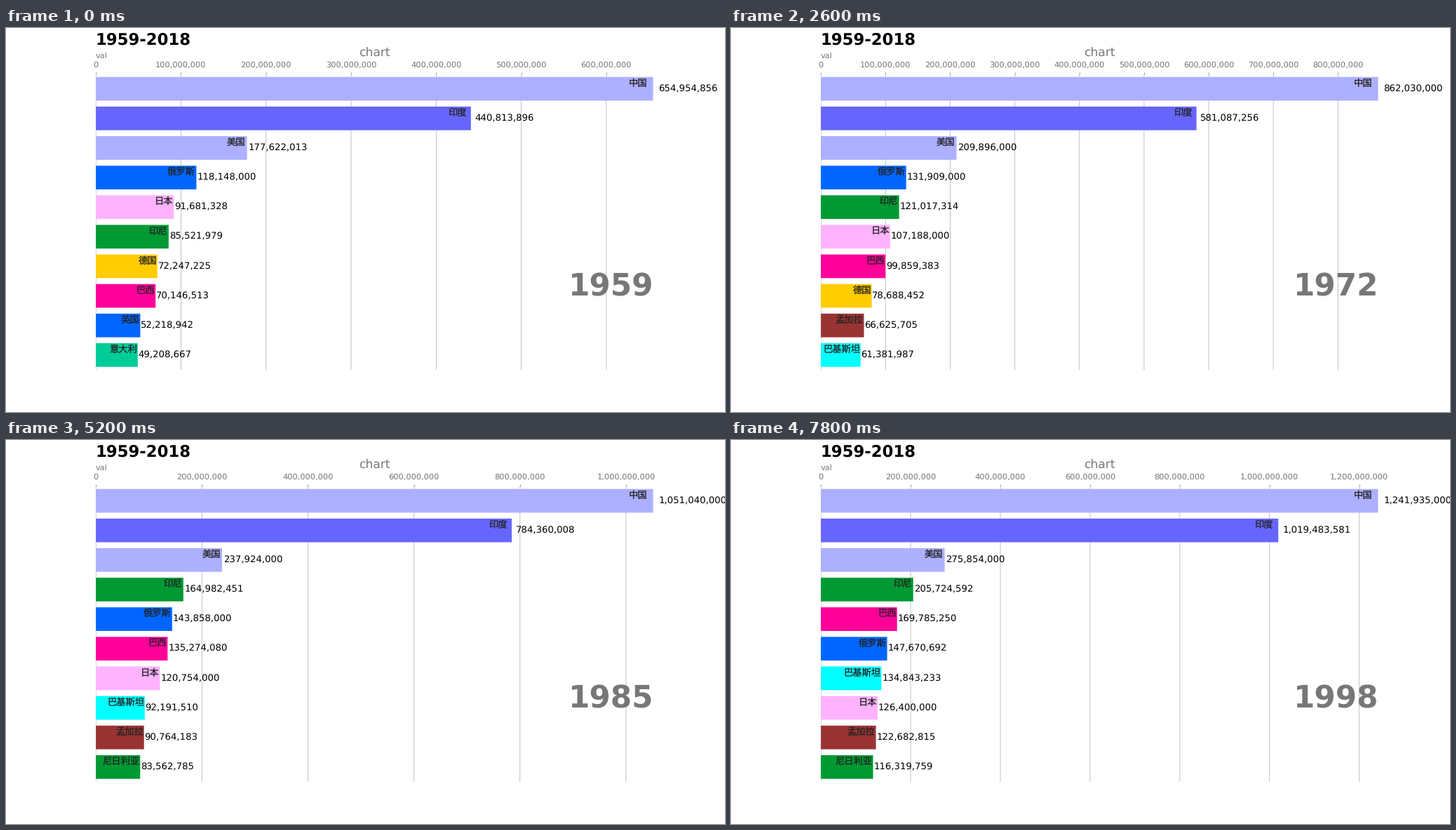
A matplotlib script that plays this animation: 1025 by 547 pixels, repeating every 8000 ms.

```python
import matplotlib.pyplot as plt
import numpy as np
from matplotlib.animation import FuncAnimation

WIDTH, HEIGHT, DPI = 1025, 547, 100
SCALE = 1025 / 15 / DPI  # font and line sizes are set for a 15 inch wide sheet
FIRST, COUNT, STEP_MS = 1959, 40, 200
ROWS = 10
GREY = "#777777"
YEARS = np.arange(FIRST, FIRST + COUNT)

# Bar colour, then millions of people at four evenly spaced years.
GROWTH = {
    "印度": ("#6666ff", 440.813896, 581.087256, 784.360008, 1019.483581),
    "美国": ("#adb0ff", 177.622013, 209.896, 237.924, 275.854),
    "俄罗斯": ("#0066ff", 118.148, 131.909, 143.858, 147.670692),
    "日本": ("#ffb3ff", 91.681328, 107.188, 120.754, 126.4),
    "印尼": ("#009933", 85.521979, 121.017314, 164.982451, 205.724592),
    "德国": ("#ffcc00", 72.247225, 78.688452, 77.684873, 82.047195),
    "巴西": ("#ff0099", 70.146513, 99.859383, 135.27408, 169.78525),
    "英国": ("#0066ff", 52.218942, 56.1, 56.55, 58.49),
    "意大利": ("#00cc99", 49.208667, 54.38, 56.59, 56.91),
    "孟加拉": ("#993333", 46, 66.625705, 90.764183, 122.682815),
    "巴基斯坦": ("#00ffff", 43.9, 61.381987, 92.19151, 134.843233),
    "尼日利亚": ("#009933", 44.2, 58.67, 83.562785, 116.319759),
}
# The leader sets the scale and grows unevenly, so it follows straight pieces.
LEADER = {1959: 654.954856, 1962: 665.77, 1967: 754.55, 1972: 862.03,
          1974: 900.35, 1978: 956.165, 1985: 1051.04, 1992: 1164.97,
          1998: 1241.935}


def cubic(points):
    """Cubic through four points spread evenly over all the years."""
    u = np.linspace(0, 3, COUNT)
    return np.polyval(np.polyfit(range(4), points, 3), u)


colors = {"中国": "#adb0ff"}
series = {"中国": np.interp(YEARS, list(LEADER), list(LEADER.values()))}
for country, (color, *points) in GROWTH.items():
    colors[country] = color
    series[country] = cubic(points)

plt.rcParams["font.family"] = "DejaVu Sans"
plt.rcParams["text.hinting"] = "no_hinting"
fig = plt.figure(figsize=(WIDTH / DPI, HEIGHT / DPI), dpi=DPI, facecolor="white")
ax = fig.add_axes([0.125, 0.11, 0.775, 0.77])


def label(x, y, text, size, **style):
    ax.text(x, y, text, size=size * SCALE, **style)


def style_axis():
    ax.set_frame_on(False)
    ax.set_yticks([])
    ax.margins(0, 0.01)
    ax.set_axisbelow(True)
    ax.xaxis.set_ticks_position("top")
    ax.xaxis.set_major_formatter("{x:,.0f}")
    ax.tick_params(axis="x", colors=GREY, labelsize=12 * SCALE,
                   length=3.5 * SCALE, width=0.8 * SCALE, pad=4.5 * SCALE)
    ax.grid(axis="x", color="#b0b0b0", linestyle="-", linewidth=0.8 * SCALE,
            snap=False)


def draw(i):
    ax.clear()
    top = sorted(series, key=lambda name: series[name][i])[-ROWS:]
    values = [round(series[name][i] * 1e6) for name in top]
    ax.barh(range(ROWS), values, color=[colors[name] for name in top], snap=False)

    for row, (name, value) in enumerate(zip(top, values)):
        gap = value / 100
        label(value - gap, row + 0.02, name, 14, ha="right", va="bottom",
              color="#222222", family="Noto Sans CJK JP")
        label(value + gap, row, f"{value:,}", 14, ha="left", va="center")

    style_axis()
    on_axes = {"transform": ax.transAxes}
    label(-0.001, 1.1, "1959-2018", 24, weight="bold", **on_axes)
    label(0, 1.053, "val", 12, color=GREY, **on_axes)
    label(0.5, 1.058, "chart", 18, color=GREY, ha="center", **on_axes)
    label(1, 0.25, str(YEARS[i]), 46, color=GREY, ha="right", weight="bold",
          **on_axes)


anim = FuncAnimation(fig, draw, frames=COUNT, interval=STEP_MS, repeat=True,
                     repeat_delay=0)
plt.show()
```
